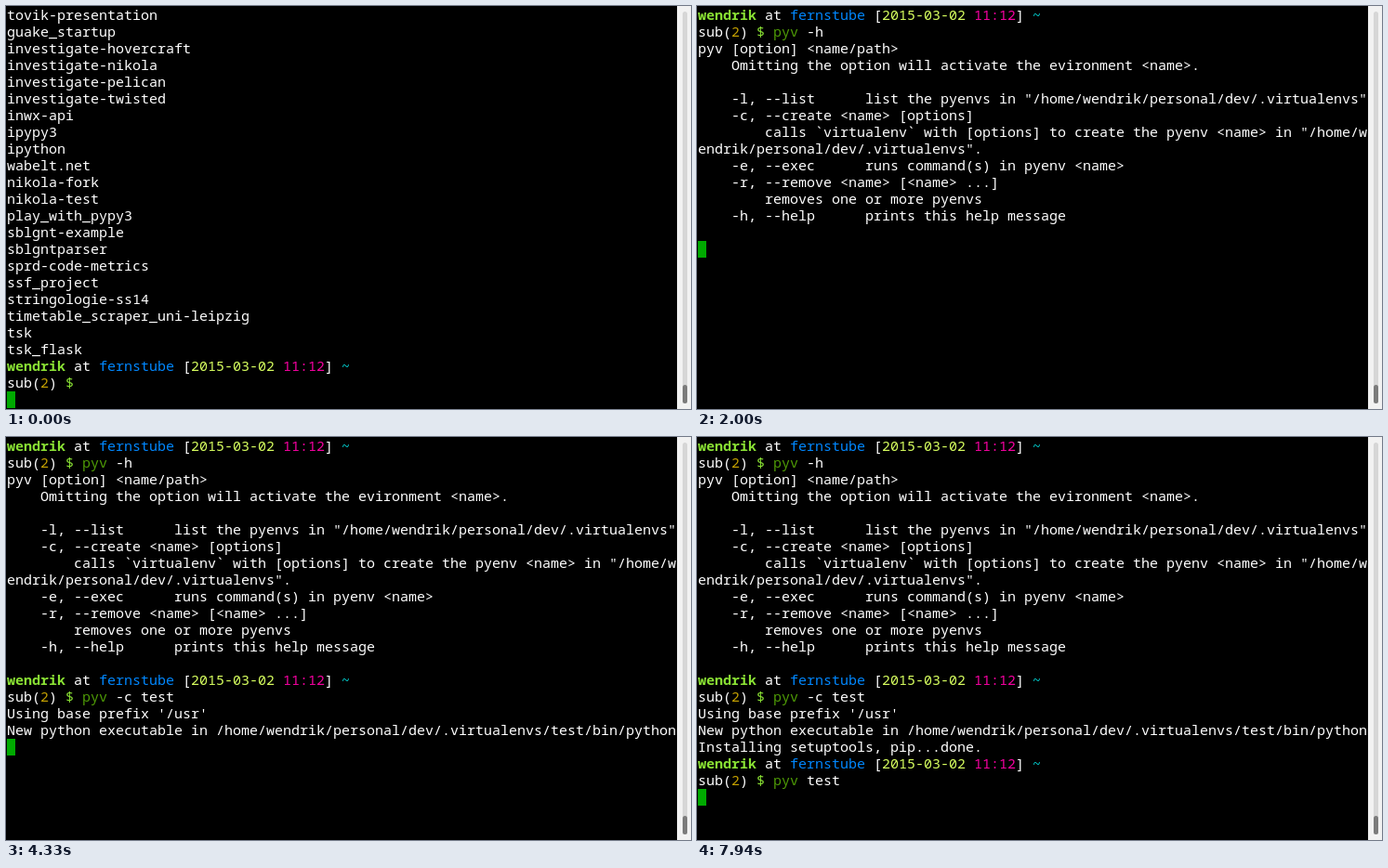
These frames come from a looping animation (737 by 434 pixels, 8000 ms). An HTML page with a canvas:

```html
<!DOCTYPE html>
<html lang="en">
<head>
<meta charset="utf-8">
<title>Terminal session</title>
<style>
  html, body { margin: 0; width: 100%; height: 100%; overflow: hidden; background: #000; }
  canvas { display: block; }
</style>
</head>
<body>
<canvas id="stage" width="737" height="434"></canvas>
<script>
const ctx = document.getElementById('stage').getContext('2d');
const LOOP = 8000, CELL = 9, LINE = 18, COLS = 80, LEFT = 1, TOP = 1, BASE = 14;
const FONT = '15px "Noto Sans Mono", "DejaVu Sans Mono", monospace';
const WHITE = '#ffffff', LIME = '#8ae234', GREEN = '#4e9a06', BLUE = '#0087ff',
      DATE = '#d7ff5f', PINK = '#f500a0', CYAN = '#00d7d7', GOLD = '#c4a000',
      CURSOR = '#00aa00';

const USER = 'wendrik', HOST = 'fernstube';
const ENVS = `/home/${USER}/personal/dev/.virtualenvs`;

const listing = `tovik-presentation
guake_startup
investigate-hovercraft
investigate-nikola
investigate-pelican
investigate-twisted
inwx-api
ipypy3
ipython
wabelt.net
nikola-fork
nikola-test
play_with_pypy3
sblgnt-example
sblgntparser
sprd-code-metrics
ssf_project
stringologie-ss14
timetable_scraper_uni-leipzig
tsk
tsk_flask`;

const help = `pyv [option] <name/path>
    Omitting the option will activate the evironment <name>.

    -l, --list      list the pyenvs in "${ENVS}"
    -c, --create <name> [options]
        calls \`virtualenv\` with [options] to create the pyenv <name> in "${ENVS}".
    -e, --exec      runs command(s) in pyenv <name>
    -r, --remove <name> [<name> ...]
        removes one or more pyenvs
    -h, --help      prints this help message
`;

// A line is a list of runs: [text, colour, style].
const plain = text => text.split('\n').flatMap(line => {
  const rows = [];
  for (let i = 0; i === 0 || i < line.length; i += COLS) rows.push([[line.slice(i, i + COLS), WHITE]]);
  return rows;
});

const prompt = (...typed) => [
  [[USER, LIME, 'bold'], [' at ', WHITE], [HOST, BLUE], [' [', WHITE], ['2015-03-02', DATE],
   [' ', WHITE], ['11:12', PINK], ['] ', WHITE], ['~', CYAN]],
  [['sub(', WHITE], ['2', GOLD], [') ', WHITE], ['$ ', LIME], ...typed]
];

// Command name, arguments, and a word underlined while it is still being typed.
const command = (name, args = '', partial = '') =>
  prompt([name, GREEN], [args, WHITE], [partial, GOLD, 'underline']);

const newline = [[]];
const helped = [...command('pyv', ' -h'), ...plain(help)];
const created = [...helped, ...command('pyv', ' -c test')];
const building = [...created, ...plain(`Using base prefix '/usr'\nNew python executable in ${ENVS}/test/bin/python`)];
const built = [...building, ...plain('Installing setuptools, pip...done.')];

// The cursor sits at the end of the last line of each screen.
const screens = [
  [0, [...plain(listing), ...prompt(), ...newline]],
  [100, prompt()],
  [1110, command('py')],
  [1410, command('pyv', ' ')],
  [1540, command('pyv', ' -')],
  [2000, [...helped, ...newline]],
  [2100, [...helped, ...prompt()]],
  [2910, [...helped, ...command('pyv')]],
  [3240, [...helped, ...command('pyv', ' ')]],
  [3420, [...helped, ...command('pyv', ' -c')]],
  [3710, [...helped, ...command('pyv', ' -c ', 't')]],
  [4020, [...helped, ...command('pyv', ' -c ', 'tes')]],
  [4220, [...created, ...newline]],
  [4330, [...building, ...newline]],
  [6070, [...built, ...newline]],
  [6810, [...built, ...prompt()]],
  [7290, [...built, ...command('pyv')]],
  [7480, [...built, ...command('pyv', ' ', 't')]],
  [7810, [...built, ...command('pyv', ' ', 'tes')]],
  [7940, [...built, ...command('pyv', ' test'), ...newline]]
];

function rect(x, y, w, h, colour) {
  ctx.fillStyle = colour;
  ctx.fillRect(x, y, w, h);
}

function pill(x, y, w, h, colour) {
  ctx.fillStyle = colour;
  ctx.beginPath();
  ctx.roundRect(x, y, w, h, w / 2);
  ctx.fill();
}

function drawLine(runs, row) {
  const y = TOP + row * LINE;
  let x = LEFT;
  for (const [text, colour, style] of runs) {
    const width = text.length * CELL;
    ctx.font = style === 'bold' ? 'bold ' + FONT : FONT;
    ctx.fillStyle = colour;
    ctx.fillText(text, x, y + BASE);
    if (style === 'underline') rect(x, y + BASE + 1, width, 1, colour);
    x += width;
  }
  return x;
}

function draw(lines) {
  rect(0, 0, 737, 434, '#000000');
  let end = LEFT;
  lines.forEach((runs, row) => { end = drawLine(runs, row); });
  rect(end, TOP + (lines.length - 1) * LINE, CELL, LINE, CURSOR);
  rect(722, 0, 15, 434, '#f2f2f2');
  pill(728, 6, 5, 422, '#d6d6d6');
  pill(728, 408, 5, 20, '#7c7c7c');
}

const start = performance.now();
function tick() {
  const time = (performance.now() - start) % LOOP;
  draw(screens.findLast(([from]) => from <= time)[1]);
  requestAnimationFrame(tick);
}
tick();
</script>
</body>
</html>
```
